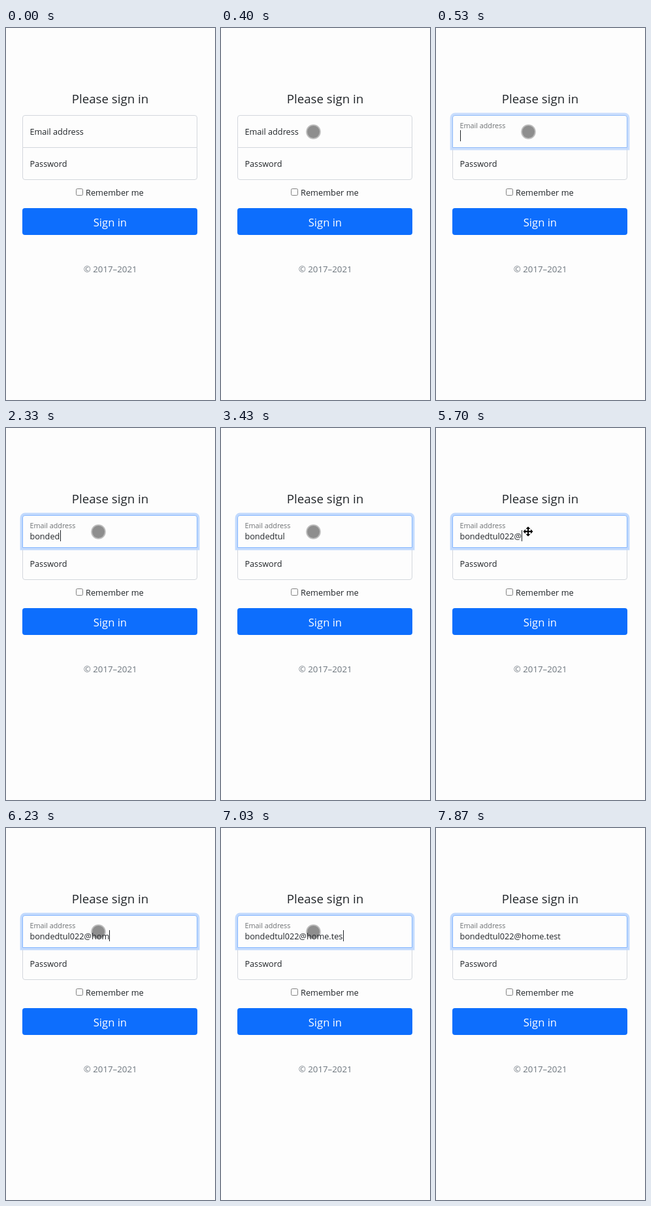
Animation of 320x568 px, one loop 8000 ms. Source, as an HTML page:

```html
<!DOCTYPE html>
<html lang="en">
<head>
<meta charset="utf-8">
<title>Sign in</title>
<style>
  html, body { margin: 0; width: 100%; height: 100%; overflow: hidden; background: #fdfdfd; }
  svg { display: block; width: 320px; height: 568px; font: 12.7px "Open Sans", "Noto Sans", sans-serif; }
  text { fill: #212529; white-space: pre; }
  .mid { text-anchor: middle; }
  .box { fill: #fdfdfd; stroke: #d3d7dd; }

  .ring, .edge, .label, .touch, .move { animation: 8s linear infinite; }
  .ring { fill: none; stroke: #c2dafd; stroke-width: 7.8; animation-name: glow; }
  .edge { animation-name: edge; }
  .label { animation-name: float; }
  .touch { animation-name: touch; animation-timing-function: step-end; }
  .move { animation-name: move; animation-timing-function: step-end; }

  /* focus lands at 420 ms */
  @keyframes glow {
    0%, 5.25% { opacity: 0; animation-timing-function: ease-in-out; }
    7.125%, 100% { opacity: 1; }
  }
  @keyframes edge {
    0%, 5.25% { stroke: #d3d7dd; animation-timing-function: ease-in-out; }
    7.125%, 100% { stroke: #86b7fe; }
  }
  @keyframes float {
    0%, 5.25% { transform: translate(36.4px, 163px) scale(1); opacity: 1; animation-timing-function: ease-in-out; }
    6.5%, 100% { transform: translate(36.4px, 153px) scale(.85); opacity: .65; }
  }
  @keyframes touch {
    0% { opacity: 0; }
    3.375% { opacity: 1; }
    67.5% { opacity: 0; }
    71.625% { opacity: 1; }
    98.375%, 100% { opacity: 0; }
  }
  @keyframes move {
    0% { opacity: 0; }
    67.5% { opacity: 1; }
    71.625%, 100% { opacity: 0; }
  }
</style>
</head>
<body>
<svg viewBox="0 0 320 568">
  <defs>
    <path id="top" d="M25.5 182.5V137a3.5 3.5 0 0 1 3.5-3.5H289a3.5 3.5 0 0 1 3.5 3.5V182.5z"/>
    <path id="arrow" d="M-1-1V-4H-3.5L0-7.5 3.5-4H1V-1z"/>
    <g id="arrows">
      <use href="#arrow"/>
      <use href="#arrow" transform="rotate(90)"/>
      <use href="#arrow" transform="rotate(180)"/>
      <use href="#arrow" transform="rotate(270)"/>
      <rect x="-1" y="-1" width="2" height="2"/>
    </g>
  </defs>

  <text class="mid" x="159.5" y="115" font-size="18.7">Please sign in</text>

  <path class="box" d="M25.5 182.5H292.5V228a3.5 3.5 0 0 1-3.5 3.5H29a3.5 3.5 0 0 1-3.5-3.5z"/>
  <use class="ring" href="#top"/>
  <use class="box edge" href="#top"/>
  <text x="36.4" y="212">Password</text>

  <g class="touch">
    <circle cx="141.5" cy="158.5" r="11.3" fill="#bdbdbd"/>
    <circle cx="141.5" cy="158.5" r="9.5" fill="#8e8e8e"/>
  </g>

  <text class="label">Email address</text>
  <text id="typed" x="36.4" y="170"></text>
  <rect id="caret" y="156" width="1" height="17" fill="#212529"/>

  <rect x="107.5" y="245.5" width="10" height="10" rx="1.8" fill="#fdfdfd" stroke="#808080"/>
  <text x="122" y="256" font-size="12.8">Remember me</text>

  <rect x="25" y="275" width="268" height="41" rx="4" fill="#0d6efd"/>
  <text class="mid" x="159.4" y="303" font-size="16.6" style="fill:#fff">Sign in</text>

  <text class="mid" x="159.7" y="373" font-size="13.3" style="fill:#6c757d">© 2017–2021</text>

  <g class="move" transform="translate(141 158)">
    <use href="#arrows" stroke="#fff" stroke-width="2"/>
    <use href="#arrows"/>
  </g>
</svg>
<script>
  const LOOP = 8000;
  const email = "bondedtul022@home.test";
  // when each key lands
  const keys = [1530, 1630, 1800, 2000, 2230, 2330, 2630, 2700, 2900, 4500, 4700,
    4830, 5700, 6000, 6130, 6230, 6370, 6570, 6730, 6900, 7000, 7200];
  // spans in which the caret shows
  const shown = [[500, 1000], [1530, 3430], [3930, 4430], [4500, 5370], [5700, 7700]];

  const typed = document.getElementById("typed");
  const caret = document.getElementById("caret");
  let start, count = -1;

  function draw(now) {
    start ??= now;
    const t = (now - start) % LOOP;
    const n = keys.filter(k => k <= t).length;
    if (n !== count) {
      count = n;
      typed.textContent = email.slice(0, n);
      const end = n ? typed.getComputedTextLength() : 0;
      caret.setAttribute("x", Math.round(36.7 + end));
    }
    caret.style.opacity = shown.some(([a, b]) => t >= a && t < b) ? 1 : 0;
    requestAnimationFrame(draw);
  }
  requestAnimationFrame(draw);
</script>
</body>
</html>
```
